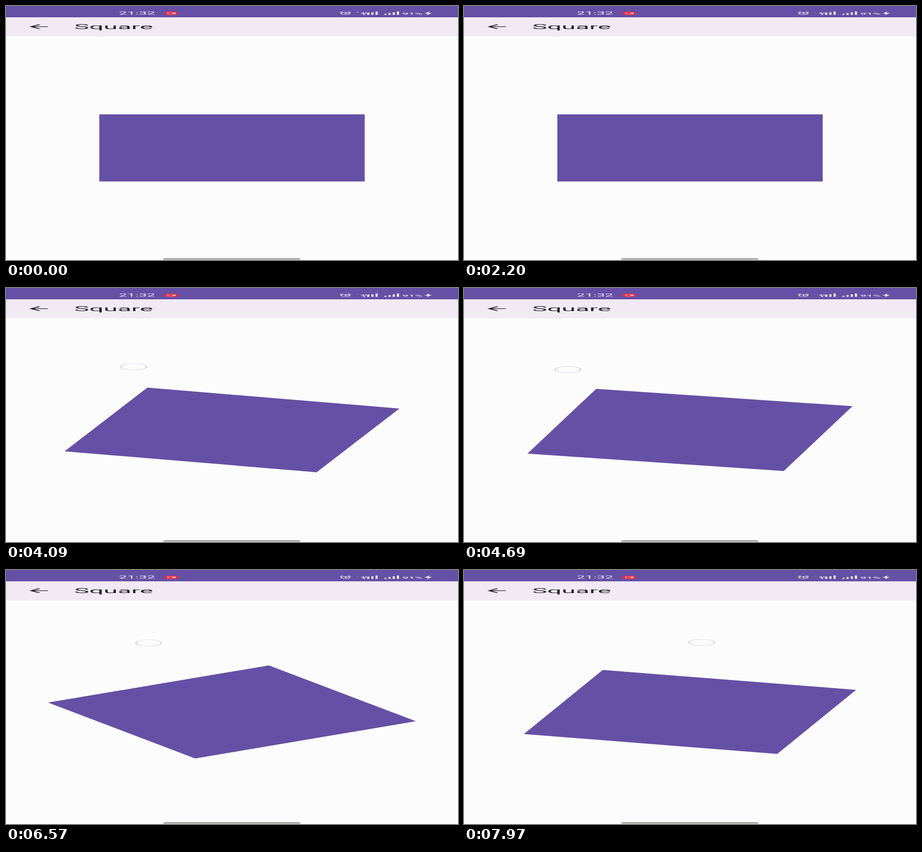
These frames come from a looping animation (998 px wide and 561 px high, 7.99 s). An HTML page:

```html
<!DOCTYPE html>
<html lang="en">
<head>
<meta charset="utf-8">
<title>Square</title>
<style>
  html, body { margin: 0; width: 100%; height: 100%; overflow: hidden; background: #fdfcfd; }
  svg { display: block; width: 100%; height: 100%; }
  text { font-family: Roboto, "Open Sans", sans-serif; }
</style>
</head>
<body>
<!-- A 1080 x 2400 phone screen, squeezed into the stage -->
<svg viewBox="0 0 1080 2400" preserveAspectRatio="none">
  <rect width="1080" height="2400" fill="#fdfcfd"/>
  <rect width="1080" height="287" fill="#f1eaf4"/>
  <rect width="1080" height="107" fill="#6650a5"/>

  <g fill="#f4f0fb">
    <text x="269.5" y="83" font-size="35">21:32</text>
    <g fill="none" stroke="#f4f0fb" stroke-width="3">
      <circle cx="811" cy="71" r="10.5"/>
      <path d="M798 61l7-7M824 61l-7-7M811 64v8h6"/>
    </g>
    <text x="847" y="71" font-size="18" font-weight="500">4G</text>
    <g id="bars"></g>
    <text x="947" y="81.5" font-size="26" font-weight="500">91%</text>
    <path d="M1012 51L1000 72h8l-3 15 13-21h-8z"/>
  </g>
  <circle id="data" cx="840" cy="60" r="3" fill="#f4f0fb"/>

  <rect x="378" y="52" width="34" height="34" rx="16" fill="#ea2a40"/>
  <g fill="none" stroke="#fbdde2" stroke-width="2">
    <rect x="386.5" y="62" width="13" height="15" rx="2"/>
    <path d="M400 69l4-5v11z" fill="#fbdde2"/>
  </g>

  <path transform="translate(45 162.5) scale(2.75)" fill="#1d1b20"
    d="M20 11H7.83l5.59-5.59L12 4l-8 8 8 8 1.41-1.41L7.83 13H20z"/>
  <text x="163" y="218" font-size="60.5" fill="#1d1b20">Square</text>

  <rect id="square" x="-317" y="-317" width="634" height="634" fill="#6650a5"/>
  <circle id="touch" r="30.5" fill="none" stroke="#d9d5ef" stroke-width="4"/>
  <rect x="375.5" y="2385" width="328" height="10" rx="5" fill="#7f7e77"/>
</svg>
<script>
  const LOOP = 7990;
  const TOUCH_START = 2380;
  const SCALE_X = 1080 / 998, SCALE_Y = 2400 / 561;
  const byId = id => document.getElementById(id);
  const square = byId('square'), touch = byId('touch'), data = byId('data');

  // time, finger x, finger y (stage pixels), square angle
  const keys = [
    [2380, 378, 163, 0],
    [3250, 363, 165, -4],
    [4090, 282, 174, -71.8],
    [5490, 188, 185, -76.6],
    [5590, 188, 185, -76.6],
    [6570, 315, 161, -33.7],
    [7970, 525, 160, 17.3]
  ];

  for (const left of [853, 904]) {
    [9, 16, 23, 31].forEach((height, i) => {
      const bar = document.createElementNS('http://www.w3.org/2000/svg', 'rect');
      const attrs = { x: left + i * 10, y: 83 - height, width: 5, height };
      for (const name in attrs) bar.setAttribute(name, attrs[name]);
      byId('bars').append(bar);
    });
  }

  const slope = (i, col) => (keys[i + 1][col] - keys[i][col]) / (keys[i + 1][0] - keys[i][0]);

  // Slope at a key that never overshoots its neighbours
  function tangent(i, col) {
    if (i === 0 || i === keys.length - 1) return 0;
    const a = slope(i - 1, col), b = slope(i, col);
    return a * b > 0 ? 2 * a * b / (a + b) : 0;
  }

  function valueAt(time, col) {
    const last = keys.length - 1;
    if (time <= keys[0][0]) return keys[0][col];
    if (time >= keys[last][0]) return keys[last][col];
    const i = keys.findIndex(key => key[0] > time) - 1;
    const span = keys[i + 1][0] - keys[i][0];
    const u = (time - keys[i][0]) / span, v = 1 - u;
    return v * v * (1 + 2 * u) * keys[i][col] + u * u * (3 - 2 * u) * keys[i + 1][col]
      + span * u * v * (v * tangent(i, col) - u * tangent(i + 1, col));
  }

  function render(time) {
    square.setAttribute('transform', `translate(540 1341) rotate(${valueAt(time, 3)})`);
    touch.setAttribute('cx', valueAt(time, 1) * SCALE_X);
    touch.setAttribute('cy', valueAt(time, 2) * SCALE_Y);
    touch.setAttribute('visibility', time < TOUCH_START ? 'hidden' : 'visible');
    data.setAttribute('opacity', time < 1850 ? 0.8 : 0.2);
  }

  function tick() {
    render(performance.now() % LOOP);
    requestAnimationFrame(tick);
  }
  tick();
</script>
</body>
</html>
```
